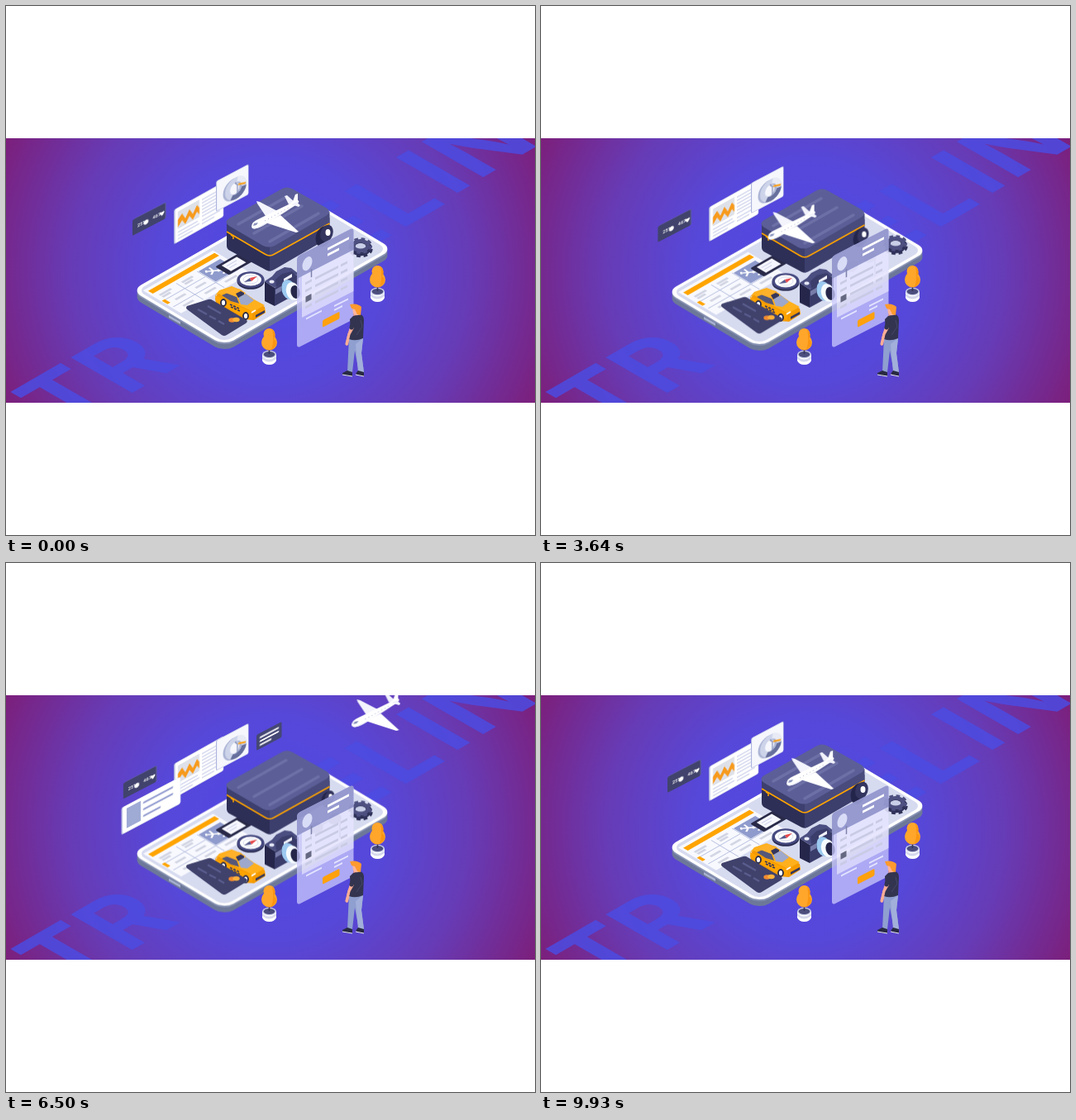
Animation of 640x640 px, one loop 10 s. Source, as an HTML page:

```html
<!DOCTYPE html>
<html lang="en">
<head>
<meta charset="utf-8">
<title>Travelling</title>
<style>
html, body { margin: 0; width: 100%; height: 100%; overflow: hidden; background: #fff; }
svg { display: block; width: 100vw; height: 100vh; }
.a { animation: 10s infinite cubic-bezier(.37, 0, .63, 1); }
.base { animation-name: base; }
.stats { animation-name: stats; }
.doc { animation: doc 5s infinite cubic-bezier(.37, 0, .63, 1); }
.donut { animation: donut 5s infinite cubic-bezier(.37, 0, .63, 1); }
.credit { animation: credit 5s infinite cubic-bezier(.37, 0, .63, 1); }
.gear { animation-name: gear; }
.glasses { animation-name: glasses; }
.wheel { animation-name: wheel; transform-origin: 386px 277px; }
.arm { animation-name: arm; transform-origin: 420px 381px; }
.plane { animation-name: plane; }
.profile { animation-name: profile; transform-origin: 211px 275px; }
.note { animation-name: note; transform-origin: 318px 209px; }
@keyframes base { 0%, 25.5%, 93.5%, 100% { transform: none } 59.5% { transform: translateY(8px) } }
@keyframes stats { 50% { transform: translate(-14px, 9.5px) } }
@keyframes doc { 50% { transform: translateY(-5.5px) } }
@keyframes donut { 50% { transform: translateY(4px) } }
@keyframes credit { 50% { transform: translateY(-8px) } }
@keyframes gear { 0%, 26%, 63%, 100% { transform: none } 44.5%, 81.5% { transform: translateY(-8.5px) } }
@keyframes glasses { 0%, 30%, 87%, 100% { opacity: 0 } 41%, 79% { opacity: .75 } }
@keyframes wheel { 0%, 28%, 88%, 100% { transform: none } 46%, 66% { transform: translate(4px) scale(.75) } }
@keyframes arm { 0%, 2%, 34%, 100% { transform: none } 12%, 25% { transform: rotate(63deg) scale(.6) } }
@keyframes plane {
  0%, 27.87% { transform: none; animation-timing-function: cubic-bezier(.333, 0, .667, .333) }
  61% { transform: translate(-337px, 198px); animation-timing-function: step-end }
  61.1% { transform: translate(195px, -114px); animation-timing-function: cubic-bezier(.17, .8, .4, .98) }
  100% { transform: none }
}
@keyframes profile {
  0%, 93%, 100% { transform: scale(0) }
  37% { transform: scale(0); animation-timing-function: cubic-bezier(.333, .667, .667, 1) }
  48% { transform: none }
  84.5% { transform: none; animation-timing-function: cubic-bezier(.333, 0, .667, .333) }
}
@keyframes note { 0%, 38%, 96%, 100% { transform: scale(0) } 47%, 89% { transform: none } }
</style>
</head>
<body>
<svg viewBox="0 0 640 640">
<defs>
  <clipPath id="band"><path d="M0 160H640V480H0z"/></clipPath>
  <radialGradient id="sky" gradientUnits="userSpaceOnUse" cx="320" cy="320" r="358">
    <stop offset="0" stop-color="#4f47e4"/><stop offset=".38" stop-color="#5648d9"/>
    <stop offset=".68" stop-color="#673bb5"/><stop offset="1" stop-color="#7c1f7b"/>
  </radialGradient>
  <rect id="slab" width="234" height="129" rx="13" transform="matrix(.872 -.5 .868 .519 152 344)"/>
  <g id="plant">
    <path d="M310 421V429Q312 434 318.500 434T327 429V421z" fill="#fff"/>
    <path d="M310 424Q318 431 327 424V427Q318 434 310 427z" fill="#d5d8ed"/>
    <ellipse cx="318.500" cy="421.500" rx="8.500" ry="4.700" fill="#c5cae6"/>
    <ellipse cx="318.500" cy="421.500" rx="6.800" ry="3.500" fill="#4b4d7c"/>
    <path d="M318.500 421V410" stroke="#34355c" stroke-width="1.600"/>
    <circle cx="318.500" cy="397" r="7" fill="#ffa62b"/><circle cx="318.500" cy="407" r="9.500" fill="#ffa62b"/>
    <path d="M322 391Q328 398 324 403Q331 409 321 416Q325 404 322 391z" fill="#fb9511"/>
  </g>
  <g id="jet"><path d="M-7 0H7M1 0L-2 -6M1 0L-2 6M-6 -2V2" stroke="#fff" stroke-width="2" fill="none"/></g>
</defs>
<g clip-path="url(#band)">
  <path d="M0 160H640V480H0z" fill="url(#sky)"/>
  <g fill="#4c4ce2" opacity=".85" font-family="Inter, 'Open Sans', sans-serif" font-weight="700" font-size="118">
    <text transform="matrix(.866 -.5 .866 .5 76 512)">T</text>
    <text transform="matrix(.866 -.5 .866 .5 146 472)">R</text>
    <text transform="matrix(.866 -.5 .866 .5 410 310)">E</text>
    <text transform="matrix(.866 -.5 .866 .5 477 271)">L</text>
    <text transform="matrix(.866 -.5 .866 .5 539.500 230)">I</text>
    <text transform="matrix(.866 -.5 .866 .5 570.500 211)">N</text>
  </g>

  <g class="a stats"><g transform="matrix(1 -.52 0 1 153 259)">
    <rect x="1.500" y="-.5" width="39" height="19" rx="1.500" fill="#5b5e8e"/>
    <rect width="39.500" height="19" rx="1.500" fill="#41436d"/>
    <g fill="#fff" font-family="Roboto, sans-serif" font-weight="500" font-size="5.500">
      <text x="6" y="12">251</text><text x="24.500" y="12">467</text>
      <circle cx="16.500" cy="11" r="2.800"/>
      <path d="M36 13.500L33 10.500Q32.500 7.500 36 9Q39 7.500 38.500 10.500z"/>
    </g>
  </g></g>

  <g class="doc"><g transform="matrix(1 -.56 0 1 204 246)">
    <rect x="-1" width="60" height="42" rx="2" fill="#a9b0dc"/>
    <rect x=".5" y=".5" width="58.500" height="41" rx="1.500" fill="#fff"/>
    <rect x="4" y="5" width="26" height="21" fill="#dfe1e9"/>
    <path d="M4 15L9 10L13 18L18 10L22 18L27 10L30 15V23L27 18L22 25L18 18L13 25L9 18L4 24z" fill="#f79a1c"/>
    <path d="M33 7H55M33 11H55M33 15H55M33 19H55M33 23H55M33 27H52M4 30H28M4 34H30M4 38H22M33 32H55M33 36H48" stroke="#b9bfe3" stroke-width="1.200"/>
  </g></g>

  <g class="donut"><g transform="matrix(1 -.53 0 1 254 212)">
    <rect width="39.500" height="37" rx="2" fill="#a9b0dc"/>
    <rect x="1" y=".5" width="38" height="36" rx="1.500" fill="#f6f7fd"/>
    <g fill="none" stroke-width="6">
      <circle cx="21.500" cy="21" r="10" stroke="#aab3d4"/>
      <circle cx="24" cy="21" r="10" stroke="#cdd4ea"/>
      <path d="M34 23A10 10 0 0 1 19 30" stroke="#67709d"/>
      <path d="M26 11A10 10 0 0 1 34 20" stroke="#e8ebf5"/>
    </g>
    <path d="M27 18L36 21" stroke="#f9a11b" stroke-width="2"/>
    <path d="M23 14L26 18V28" stroke="#8d97bd" stroke-width="1.500" fill="none"/>
  </g></g>

  <g class="a note"><g transform="matrix(1 -.53 0 1 303 208)">
    <rect width="30.500" height="19" rx="1.500" fill="#454774"/>
    <path d="M4 5.500H27M4 10H27M4 14.500H18" stroke="#fff" stroke-width="2"/>
  </g></g>

  <g class="a base">
    <g fill="#6d7899"><use href="#slab" y="8"/><use href="#slab" y="6"/><use href="#slab" y="4"/></g>
    <use href="#slab" y="2" fill="#8994b5"/><use href="#slab" fill="#fff"/>
    <path d="M197 374L211 382V385L197 377z" fill="#a9b2d0"/>
    <g transform="matrix(.872 -.5 .868 .519 152 344)">
      <rect x="4" y="4" width="226" height="121" rx="10" fill="#d7dbf0"/>
      <path d="M160 9H222M210 17V40" stroke="#fff" stroke-width="3"/>
      <rect x="8" y="8" width="97" height="53" fill="#f8f9ff"/>
      <rect x="11" y="12" width="92" height="6.500" fill="#ffa400"/>
      <rect x="70" y="23" width="30" height="24" fill="#8f9bcc"/>
      <use href="#jet" transform="translate(80 32) rotate(35)"/><use href="#jet" transform="translate(90 39) rotate(35)"/>
      <path d="M10 34H68M10 48H100M40 22V60M69 22V60" stroke="#b8c0df"/>
      <path d="M14 25H30M14 29H25M45 25H60M45 29H56M20 41H34M48 41H62M18 54H32M48 54H63M76 54H92" stroke="#d2d5e3" stroke-width="3"/>
      <path d="M9 33H13V41H9z" fill="#ffa400"/>
      <rect x="87" y="29" width="46" height="19" rx="2" fill="#292a48"/>
      <rect x="93" y="32" width="21" height="13" fill="#f6f7ff"/>
      <path d="M96 36H110M96 40H106" stroke="#c9cee6"/>
    </g>

    <ellipse cx="296" cy="333" rx="16.500" ry="9.800" fill="#292b50"/>
    <ellipse cx="296" cy="331" rx="16.500" ry="9.800" fill="#464a80"/>
    <ellipse cx="296" cy="331" rx="13" ry="7.600" fill="#fff"/>
    <ellipse cx="296" cy="331" rx="9" ry="5" fill="none" stroke="#d9ddef"/>
    <path d="M288 334L295 329L297 333z" fill="#555a8d"/><path d="M304 327L295 329L297 333z" fill="#e5484d"/>

    <path d="M267 268V290Q267 294 271 296L312 318Q319 322 319 320V296z" fill="#2e2f57"/>
    <path d="M319 296V321Q323 320 326 318L388 282Q391.500 280 391.500 276V256z" fill="#3c3e6c"/>
    <path d="M267 260V272L313 299Q319 303 319 301V286z" fill="#3d3f6e"/>
    <path d="M319 286V302Q323 301 325 300L391.500 263V249z" fill="#484b7c"/>
    <path d="M270 257L334 221Q340 218 346 221L387 244Q395 249 387 254L325 290Q318 293 311 290L270 266Q263 261 270 257z" fill="#5c5f97"/>
    <path d="M281 264L339 231M300 275L358 242M319 285L378 251" stroke="#6d70a6" stroke-width="3.500" stroke-linecap="round"/>
    <path d="M267 273L313 300Q319 304 325 300L391.500 263" fill="none" stroke="#ffa400" stroke-width="1.700"/>
    <path d="M272 277L275 279V282" fill="none" stroke="#ffa400" stroke-width="1.500"/>
    <g class="a wheel">
      <ellipse cx="384" cy="279" rx="9" ry="13" transform="rotate(18 384 279)" fill="#24254a"/>
      <ellipse cx="388" cy="275" rx="7.500" ry="10.500" transform="rotate(18 388 275)" fill="#34365f"/>
      <ellipse cx="389.500" cy="274" rx="3" ry="4" fill="#fff"/>
    </g>

    <path d="M313 333L325 341V363L313 357z" fill="#25264a"/>
    <path d="M325 341L354 324V347L325 363z" fill="#3a3c6a"/>
    <path d="M313 333L322 327L327 321L337 316L345 317L354 324L325 341z" fill="#4b4e80"/>
    <path d="M326 331L334 324L346 321L351 327L327 340z" fill="#3b3d6b"/>
    <ellipse cx="321.500" cy="333.500" rx="3" ry="2" fill="#e8eaf8"/>
    <path d="M336 330L346 324V328L336 333z" fill="#f2f3fc"/><path d="M326 343L333 339V345L326 349z" fill="#777ca9"/>
    <ellipse cx="342" cy="343" rx="8.500" ry="12" transform="rotate(-14 342 343)" fill="#9cc9f0"/>
    <ellipse cx="347" cy="345" rx="8" ry="11" transform="rotate(-14 347 345)" fill="#f5fbff"/>
    <ellipse cx="350" cy="346" rx="5.500" ry="8" transform="rotate(-14 350 346)" fill="#25264a"/>

    <path d="M253 354L256 348L271 340L284 343L300 357L313 364L314 371L300 380L287 379L254 359z" fill="#f59a00"/>
    <path d="M253 350L258 344L273 339L283 343L300 355L313 362L299 370L272 357L258 348z" fill="#ffb01c"/>
    <path d="M253 350L272 359L298 370V378L284 374L254 357z" fill="#ffa400"/>
    <path d="M261 350L268 347L279 352L282 360L272 357z" fill="#555779"/>
    <path d="M284 361L281 352L290 348L300 356L292 362z" fill="#9da8cc"/>
    <path d="M263 346L275 340L290 347L279 352z" fill="#ffb12b"/>
    <path d="M278 348L284 345L288 347V349L281 353z" fill="#34365c"/>
    <path d="M302 374L313 368V371L302 377z" fill="#34365c"/>
    <path d="M271 361L282 366M272 364L283 369" stroke="#34365c" stroke-width="1.800" stroke-dasharray="3 1.500"/>
    <g fill="#fff" stroke="#292a48" stroke-width="1.800">
      <ellipse cx="263" cy="359" rx="3" ry="4"/><ellipse cx="290" cy="375" rx="3" ry="4"/>
    </g>
    <path d="M297 371L302 368" stroke="#fff" stroke-width="2"/>

    <g class="credit">
      <path d="M219 363L243 355.500Q247 354 250 356L291 380Q293 382 290 384L267 398Q264 400 261 398L219 367Q217 365 219 363z" fill="#40426c"/>
      <path d="M232 367L243 373M246 375L254 379M244 363L260 372M257 381L264 385" stroke="#5a5d8d" stroke-width="2.200"/>
      <ellipse cx="273.500" cy="380" rx="4.200" ry="2.800" fill="#f28b30"/><ellipse cx="278.500" cy="379.500" rx="4.200" ry="2.800" fill="#ffb13b"/>
    </g>

    <g class="a gear" fill="none">
      <g stroke="#2f3158"><ellipse cx="429" cy="294" rx="9.500" ry="6" stroke-width="5"/><ellipse cx="429" cy="294" rx="12.500" ry="8" stroke-width="4.500" stroke-dasharray="4.500 3.700"/></g>
      <ellipse cx="429" cy="291" rx="6.500" ry="4" fill="#c9cfe8"/>
      <g stroke="#4d5080"><ellipse cx="429" cy="290" rx="9" ry="5.800" stroke-width="4.500"/><ellipse cx="429" cy="290" rx="12.200" ry="7.800" stroke-width="4" stroke-dasharray="4.500 3.500"/></g>
    </g>
    <g class="a glasses" fill="#565a82">
      <ellipse cx="376" cy="313" rx="8" ry="6.500" transform="rotate(-25 376 313)"/><ellipse cx="398" cy="302" rx="8" ry="6.500" transform="rotate(-25 398 302)"/>
      <path d="M369 313V328M382 309L392 304M404 300V325" stroke="#565a82" stroke-width="1.700" fill="none"/>
    </g>
  </g>

  <g class="a profile"><g transform="matrix(1 -.53 0 1 140 296)">
    <rect x="-.5" width="71.500" height="33" rx="2" fill="#b6bde2"/>
    <rect x="1" y=".3" width="70" height="32" rx="2" fill="#fff"/>
    <rect x="6" y="4" width="17" height="24" fill="#9faad5"/>
    <path d="M26 8H62M26 16H62M26 24H47" stroke="#9aa3d3" stroke-width="2.500"/>
  </g></g>

  <use href="#plant"/><use href="#plant" x="131" y="-76"/>

  <g transform="matrix(1 -.51 0 1 352 303)">
    <rect width="68.500" height="111" rx="4" fill="#c9c8fb" opacity=".76"/>
    <path d="M0 27V4Q0 0 4 0H64.500Q68.500 0 68.500 4V27z" fill="#8c91c8" opacity=".85"/>
    <rect x="6" y="27" width="62.500" height="50" fill="#f6f6ff" opacity=".55"/>
    <ellipse cx="12.500" cy="15" rx="6" ry="8" fill="#d9dcf6"/>
    <path d="M37 10H63M37 17H51" stroke="#fff" stroke-width="3"/>
    <path d="M17.500 24V34" stroke="#7e83ad" stroke-width="1.500"/>
    <path d="M10 38H18M22 38H50M53 38H61M10 47H18M22 47H50M53 47H61M22 57H50M53 57H61M10 67H18M22 67H50M53 67H61" stroke="#c9cbe4" stroke-width="3"/>
    <rect x="10.500" y="54" width="7" height="7" fill="#666982"/>
    <path d="M11 81H30M45 83H62M45 88H55" stroke="#e4e5ff" stroke-width="2"/>
    <rect x="31" y="93" width="20.500" height="8.500" rx="1.500" fill="#ffa10d"/>
  </g>

  <path d="M415 401L432 402L430 420L433 443H427L422 417L419 443H413z" fill="#8f9fd0"/>
  <path d="M423 409L426 443H433L430 420L432 402z" fill="#a2afda"/>
  <path d="M413 441L419 443V448Q412 448 407 446V444zM426 441L433 443V448Q427 448 423 445z" fill="#292a43"/>
  <path d="M407 446L419 448M423 446L433 448" stroke="#e9eaf5"/>
  <path d="M418 388L415 397L412.500 409" fill="none" stroke="#f9ad96" stroke-width="3.200" stroke-linecap="round"/>
  <path d="M421 370H429V377L424 379L420 376z" fill="#f7a48d"/>
  <path d="M420 375L428 373Q433 374 433 380L432 402Q423 406 415 403L417 391L416 379z" fill="#33344f"/>
  <path d="M429 380L431 388L424 398" stroke="#45476a" fill="none"/>
  <g class="a arm">
    <path d="M419 390L415 397L412 409" fill="none" stroke="#f9ad96" stroke-width="3.200" stroke-linecap="round"/>
    <path d="M420.500 380L418 389" stroke="#33344f" stroke-width="5" stroke-linecap="round"/>
  </g>
  <path d="M419 364L429 364L428 373Q423 376 420 372z" fill="#fbb49c"/>
  <path d="M416 361Q425 359 430 364L429 374L425 373L422 367L418 366z" fill="#ff9a2f"/>

  <g class="a plane">
    <path d="M316 257L304 239L303 236L307 237L332 250z" fill="#f3f4fc"/>
    <path d="M342 240L337 230L340 229L349 237z" fill="#f0f1fb"/>
    <path d="M297 267Q297 261 306 257.500L342 240Q349 235 353 235Q356 236 352 240L314 264Q303 271 298 269z" fill="#fff"/>
    <path d="M298 269Q306 268 316 261.500L345 245L314 264Q303 271 298 269z" fill="#e6e8f6"/>
    <path d="M314 262L332 253L354 273L351 274L326 266z" fill="#fff"/>
    <path d="M346 239L350 228L353 227V238z" fill="#fff"/><path d="M345 240L351 237L356 241L354 243z" fill="#f3f4fc"/>
    <path d="M300 263L305 262L303 265L299 266z" fill="#8b95bf"/>
    <path d="M313 260L344 243" stroke="#a3abd0" stroke-dasharray="1 3.500"/>
  </g>
</g>
</svg>
</body>
</html>
```
